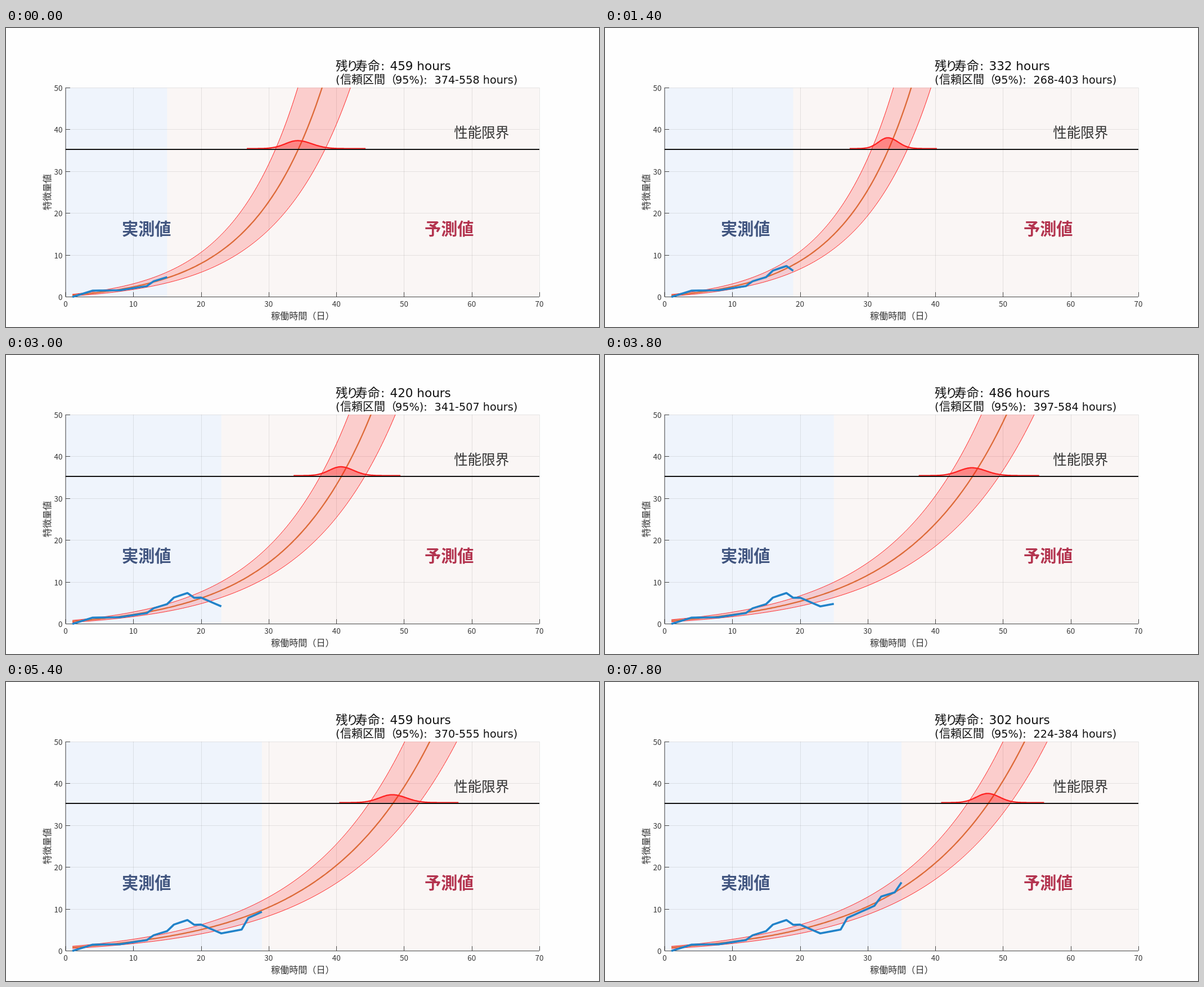
Recreate the animation shown at these times as an HTML page. Size 1054 px wide and 532 px high, loop 8 s.

```html
<!DOCTYPE html>
<html lang="ja">
<head>
<meta charset="utf-8">
<title>残り寿命の予測</title>
<style>
  html, body { margin: 0; width: 100%; height: 100%; overflow: hidden; background: #fefefe; }
  svg { display: block; width: 1054px; height: 532px; }
  text { font-family: "Noto Sans CJK JP", "Noto Sans CJK", sans-serif; fill: #333; white-space: pre; }
  .tick { font-size: 13.5px; font-weight: 500; }
  .axis { font-size: 16.1px; }
  .big { font-size: 29.2px; font-weight: 700; }
  .head text { fill: #111; }
  .head .latin { font-family: "DejaVu Sans", sans-serif; }
  .l1 { font-size: 21.5px; }
  .l2 { font-size: 19.2px; }
  path { fill: none; stroke-linejoin: round; }
</style>
</head>
<body>
<svg viewBox="0 0 1054 532">
  <clipPath id="plot"><rect x="106" y="106" width="842.5" height="373"/></clipPath>
  <rect x="106" y="106.5" width="842" height="372" fill="#faf6f5"/>
  <rect id="past" x="106" y="106.5" height="372" fill="#eff4fc"/>
  <path id="grid" stroke="#000" stroke-opacity=".09"/>
  <path id="frame" stroke="#444"/>
  <g id="ticks"></g>
  <g clip-path="url(#plot)">
    <path id="band" style="fill:#f00;fill-opacity:.17"/>
    <path id="upper" stroke="#ff2a2a"/>
    <path id="lower" stroke="#ff2a2a"/>
    <path id="mean" stroke="#dd6a38" stroke-width="2.3"/>
  </g>
  <path id="data" stroke="#2183c9" stroke-width="3.6"/>
  <path id="bump" stroke="#ff2020" stroke-width="2.3" style="fill:#f00;fill-opacity:.35"/>
  <path d="M106 216H948" stroke="#111" stroke-width="2"/>

  <text x="796.3" y="195" font-size="24.5">性能限界</text>
  <text class="big" x="206" y="367.5" style="fill:#425680">実測値</text>
  <text class="big" x="744" y="367.5" style="fill:#b3344f">予測値</text>
  <text class="axis" x="471" y="517.5">稼働時間（日）</text>
  <text class="axis" text-anchor="middle" transform="translate(79 292) rotate(-90)">特徴量値</text>

  <g class="head">
    <text class="l1" x="586 605 621 643" y="75">残り寿命</text>
    <text class="l1 latin" x="666" y="75">:</text>
    <text class="l1 latin" id="rul" x="682.5" y="75"></text>
    <text class="l2 latin" x="586" y="99">(</text>
    <text x="594" y="99" font-size="20">信頼区間（</text>
    <text class="l2 latin" x="692" y="99">95%):</text>
    <text class="l2 latin" id="range" x="761.5" y="99"></text>
  </g>
</svg>
<script>
const $ = id => document.getElementById(id);
const X = d => 106 + d * 842 / 70;
const Y = v => 478.5 - v * 7.44;
const LIMIT = 35.3, OFFSET = 1;

// Turning points of the measured feature: day, value
const measured = [
  [1, 0], [4, 1.5], [8, 1.6], [12, 2.6], [13, 3.75], [15, 4.75], [16, 6.3], [18, 7.4], [19, 6.25],
  [20, 6.3], [23, 4.2], [26, 5.1], [27, 7.9], [31, 10.8], [32, 13], [34, 14], [35, 16.4]
];

// day, hours left, low bound, high bound
const forecasts = [
  [15, 459, 374, 558], [17, 370, 302, 448], [19, 332, 268, 403], [23, 420, 341, 507], [25, 486, 397, 584],
  [27, 494, 402, 594], [29, 459, 370, 555], [32, 384, 301, 472], [35, 302, 224, 384]
];

// Row of a key list at a day, linear between keys
function at(keys, day) {
  const i = Math.max(1, keys.findIndex(k => k[0] >= day));
  const a = keys[i - 1], b = keys[i];
  const k = (day - a[0]) / (b[0] - a[0]);
  return a.map((v, j) => v + (b[j] - v) * k);
}

// Exponential growth from a start on day 1 that meets the limit on day `end`
function growth(start, end) {
  const rate = Math.log((LIMIT + OFFSET) / start) / (end - 1);
  const pts = [];
  for (let d = 1; d < end + 6; d += .25)
    pts.push([X(d), Y(start * Math.exp(rate * (d - 1)) - OFFSET)]);
  return pts;
}

// Bell of constant area with separate left and right spread
function bell(mid, low, high) {
  const x0 = X(mid), sl = (x0 - X(low)) / 1.96, sr = (X(high) - x0) / 1.96;
  const height = 665 / (sl + sr);
  const pts = [];
  for (let x = -4.15 * sl; x <= 4.8 * sr; x++) {
    const z = x / (x < 0 ? sl : sr);
    pts.push([x0 + 1.8 + x, 214.6 - height * Math.exp(-z * z / 2)]);
  }
  return pts;
}

function drawAxes() {
  let grid = '', frame = 'M106 106V478.5H948', labels = '';
  for (let d = 0; d <= 70; d += 10) {
    const x = Math.round(X(d)) + (d ? .5 : 0);
    grid += `M${x} 106V478`;
    frame += `M${x} 478v-8`;
    labels += `<text class="tick" text-anchor="middle" x="${X(d)}" y="496">${d}</text>`;
  }
  for (let v = 0; v <= 50; v += 10) {
    const y = Math.floor(Y(v)) + .5;
    grid += `M106 ${y}H948`;
    frame += `M106 ${y}h8`;
    labels += `<text class="tick" text-anchor="end" x="100.5" y="${y + 5}">${v}</text>`;
  }
  $('grid').setAttribute('d', grid);
  $('frame').setAttribute('d', frame);
  $('ticks').innerHTML = labels;
}

function trace(id, pts) {
  $(id).setAttribute('d', 'M' + pts.map(p => p.map(n => n.toFixed(2)).join(' ')).join('L'));
}

function draw(day) {
  const hours = at(forecasts, day).slice(1);
  const [mid, low, high] = hours.map(h => day + h / 24);
  const start = 1.4 + .03 * (mid - 33.3);
  const upper = growth(start * 1.15, low + .42);
  const lower = growth(start * .86, high + .08);
  trace('upper', upper);
  trace('lower', lower);
  trace('mean', growth(start, mid + .25));
  trace('band', upper.concat(lower.reverse()));
  trace('bump', bell(mid, low, high));
  trace('data', Array.from({ length: day }, (_, i) => [X(i + 1), Y(at(measured, i + 1)[1])]));

  const [left, from, to] = hours.map(Math.ceil);
  $('past').setAttribute('width', X(day) - 106);
  $('rul').textContent = `${left} hours`;
  $('range').textContent = `${from}-${to} hours)`;
}

let shown = 0;
function tick() {
  const t = performance.now() % 8000;
  const day = 15 + Math.floor((t + 200) / 400);
  if (day !== shown) draw(shown = day);
  requestAnimationFrame(tick);
}

drawAxes();
tick();
</script>
</body>
</html>
```
